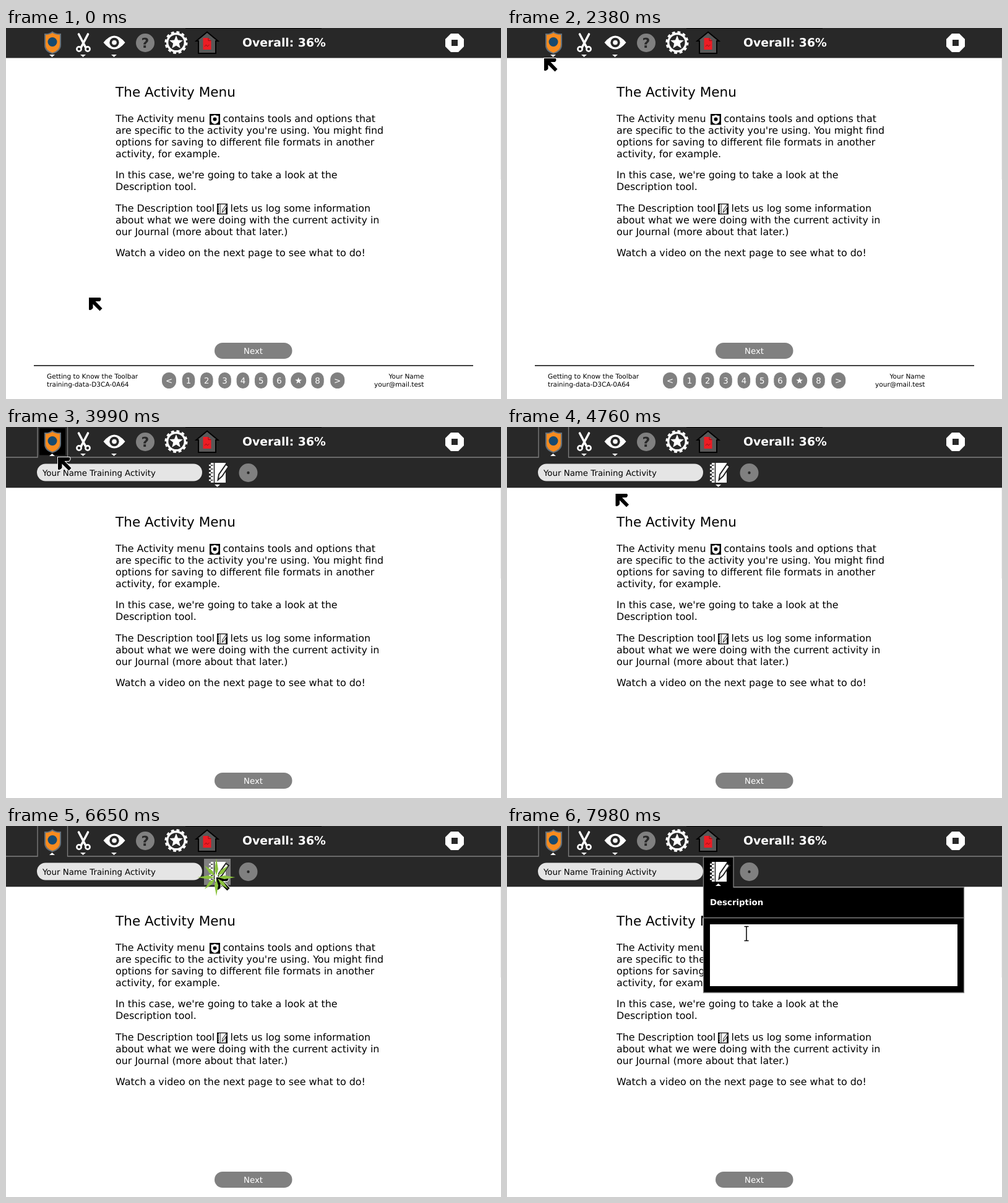
An HTML page that plays this animation: 800x600 px, repeating every 8000 ms.

```html
<!DOCTYPE html>
<html lang="en">
<head>
<meta charset="utf-8">
<title>The Activity Menu</title>
<style>
  html, body { margin: 0; width: 100%; height: 100%; overflow: hidden; background: #fff; }
  svg { display: block; width: 800px; height: 600px; }
  text { font-family: "DejaVu Sans", sans-serif; white-space: pre; text-rendering: geometricPrecision; }
  .body { font-size: 15.9px; }
  .title { font-size: 21.6px; }
  .small { font-size: 10.55px; }
  .ui { font-size: 13.33px; }
  .mid { text-anchor: middle; fill: #fff; }
  .bold { font-weight: bold; fill: #fff; }
</style>
</head>
<body>
<svg viewBox="0 0 800 600" xmlns="http://www.w3.org/2000/svg">
  <defs>
    <g id="book">
      <path d="M3 1H27V33H3Z" fill="#fff"/>
      <path d="M8.500 1V33" stroke="#222" stroke-width="1.600"/>
      <path d="M0 5H5M0 11H5M0 17H5M0 23H5M0 29H5" stroke="#fff" stroke-width="2.600"/>
      <path d="M3 5H6.500M3 11H6.500M3 17H6.500M3 23H6.500M3 29H6.500" stroke="#222" stroke-width="1.300"/>
      <path d="M27.500 5L30.500 7L20.500 22L16 26L17 20Z" fill="#fff" stroke="#222" stroke-width="4" paint-order="stroke"/>
    </g>
    <path id="shield" d="M63 10Q70 10.500 75 6.500Q80 10.500 88 10V27Q88 37 75 41Q62.500 37 63 27Z"/>
    <path id="down" d="M-4.500 0H4.500L0 4Z" fill="#fff"/>
    <path id="up" d="M-4.500 4H4.500L0 0Z" fill="#fff"/>
  </defs>

  <g id="page">
    <text class="title" x="177" y="111">The Activity Menu</text>
    <g id="copy" class="body"></g>
    <g transform="translate(329 139)">
      <rect width="17" height="17.500"/>
      <path d="M2.500 3Q6 3 8.500 1.500Q11 3 14.500 3V11Q14 15 8.500 16.500Q3 15 2.500 11Z" fill="#fff"/>
      <circle cx="8.500" cy="8.500" r="3"/>
    </g>
    <g transform="translate(341 284)">
      <rect width="17" height="17.500"/>
      <use href="#book" transform="translate(1.500 .700) scale(.47)"/>
    </g>
    <rect x="337" y="509" width="125.500" height="26" rx="13" fill="#808080"/>
    <text class="ui mid" x="399.500" y="527">Next</text>
  </g>

  <g id="footer">
    <path d="M45 546H755" stroke="#000" stroke-width="1.600"/>
    <g class="small">
      <text x="66" y="567">Getting to Know the Toolbar</text>
      <text x="66" y="580">training-data-D3CA-0A64</text>
      <text x="675.500" y="567" text-anchor="end">Your Name</text>
      <text x="675.500" y="580" text-anchor="end">your@mail.test</text>
    </g>
    <g id="nav"></g>
  </g>

  <rect x="799" y="48" width="1" height="197" fill="#eee"/>
  <rect width="800" height="48.500" fill="#282828"/>
  <rect x="290" width="220" height="1"/>

  <g id="sub">
    <rect y="48" width="800" height="50.300" fill="#282828"/>
    <path d="M0 49H51V0M99.500 0V49H800" fill="none" stroke="#808080" stroke-width="1.300"/>
    <rect x="50" y="59.500" width="267" height="28" rx="14" fill="#e5e5e5"/>
    <text class="ui" x="59" y="78.500">Your Name Training Activity</text>
    <rect id="bookBg" x="320" y="53" width="43" height="42.500"/>
    <g id="palette">
      <path d="M317.500 50H366V99H738.500V269.500H317.500Z" fill="#000" stroke="#808080" stroke-width="1.300"/>
      <path d="M318 148.500H738" stroke="#808080" stroke-width="1.300"/>
      <text class="ui bold" x="328" y="128">Description</text>
      <rect x="328" y="159" width="400" height="100" fill="#fff"/>
    </g>
    <use href="#book" x="328" y="57"/>
    <use id="bookTip" x="341.500" y="93"/>
    <circle cx="391.500" cy="74" r="15" fill="#808080"/>
    <circle cx="391.500" cy="74" r="2.200" fill="#282828"/>
  </g>

  <rect id="hover" x="54" y="2" width="42" height="43.500"/>
  <use href="#shield" fill="#f68b1f" stroke="#66717a" stroke-width="2"/>
  <circle cx="75" cy="22.500" r="7.500" fill="#164a70"/>
  <use id="menuTip" x="74.500" y="43"/>

  <g fill="none" stroke="#fff" stroke-linecap="round">
    <path d="M117.500 10L128.500 31M132.500 10L121.500 31" stroke-width="3.600"/>
    <circle cx="118" cy="34" r="3.600" stroke-width="2.600"/>
    <circle cx="132" cy="34" r="3.600" stroke-width="2.600"/>
  </g>
  <use href="#down" x="124.500" y="43"/>

  <path d="M157.500 23.500Q175 1.500 192.500 23.500Q175 45.500 157.500 23.500Z" fill="#fff"/>
  <circle cx="175" cy="23.500" r="7.700" fill="#282828"/>
  <circle cx="175" cy="23.500" r="3.800" fill="#fff"/>
  <use href="#down" x="174.500" y="43"/>

  <circle cx="225" cy="24" r="15" fill="#808080"/>
  <text x="225" y="32" text-anchor="middle" font-size="22" font-weight="bold" fill="#282828">?</text>

  <circle cx="275" cy="23.500" r="14.300" fill="none" stroke="#fff" stroke-width="3.400"/>
  <circle cx="275" cy="23.500" r="16.700" fill="none" stroke="#fff" stroke-width="3.600" stroke-dasharray="4.700 4.044"/>
  <path id="star" fill="#fff"/>

  <path d="M325 6.500L342.500 21H339V41H311V21H307.500Z" fill="#585858" stroke="#000" stroke-width="2"/>
  <path d="M318.500 16H327L331.500 20.500V35H318.500Z" fill="#ed1c24"/>
  <path d="M327 16V20.500H331.500M321 30L323.500 27L325.500 30L328.500 27" fill="none" stroke="#8f1016"/>

  <text class="bold" x="382" y="29.500" font-size="18.800">Overall: 36%</text>

  <path d="M719 9H731L740 18V30L731 39H719L710 30V18Z" fill="#fff"/>
  <rect x="720" y="19" width="10" height="10" fill="#282828"/>

  <path id="arrow" d="M0 0H18.500Q21 3 17.500 6H10.500L21.500 17.500L17.500 21.500L6.500 10.500V17Q3 22 0 19.500Z" stroke="#fff" stroke-width="2" paint-order="stroke"/>
  <path id="beam" d="M-3.500 -11.500H3.500M-3.500 11.500H3.500M0 -11.500V11.500" stroke="#000" stroke-width="1.500"/>
  <g id="burst" fill="#8cc33f"></g>
</svg>
<script>
const $ = id => document.getElementById(id);

const copy = [
  [152, "The Activity menu"],
  [171.3, "are specific to the activity you're using. You might find"],
  [190, "options for saving to different file formats in another"],
  [208.7, "activity, for example."],
  [243.4, "In this case, we're going to take a look at the"],
  [262, "Description tool."],
  [297, "The Description tool"],
  [316, "about what we were doing with the current activity in"],
  [334.6, "our Journal (more about that later.)"],
  [369.4, "Watch a video on the next page to see what to do!"]
];
const line = (x, y, s) => `<text x="${x}" y="${y}">${s}</text>`;
$("copy").innerHTML = copy.map(([y, s]) => line(177, y, s)).join("") +
  line(350.5, 152, "contains tools and options that") +
  line(362.5, 297, "lets us log some information");

const starPath = (cx, cy, r, inner) => "M" + Array.from({ length: 10 }, (_, i) => {
  const a = i * Math.PI / 5, d = i % 2 ? inner : r;
  return (cx + d * Math.sin(a)).toFixed(2) + " " + (cy - d * Math.cos(a)).toFixed(2);
}).join("L") + "Z";
$("star").setAttribute("d", starPath(275, 23.5, 11.5, 5));

const nav = [["&lt;", 263.5, 23], ["1", 295, 20.5], ["2", 324.3, 20.5], ["3", 353.6, 20.5],
  ["4", 382.9, 20.5], ["5", 412.2, 20.5], ["6", 441.5, 20.5], ["", 472.7, 25],
  ["8", 503.5, 20.5], ["&gt;", 535.7, 23]];
$("nav").innerHTML = nav.map(([s, x, w]) =>
  `<rect x="${x - w / 2}" y="557" width="${w}" height="26" rx="${w / 2}" fill="#808080"/>` +
  (s ? `<text class="ui mid" x="${x}" y="575">${s}</text>`
     : `<path d="${starPath(x, 570.5, 5.6, 2.2)}" fill="#fff"/>`)).join("");

$("burst").innerHTML = Array.from({ length: 8 }, (_, i) => {
  const r = i % 2 ? 27 : 30.5;
  return `<path d="M0 -3L3 -13L0 ${-r}L-3 -13Z" transform="rotate(${i * 45})"/>`;
}).join("");

// Pointer track: time, x, y
const track = [
  [0, 134, 436], [420, 86, 378], [840, 47, 307], [1050, 38, 272], [1260, 38, 235],
  [1470, 37, 179], [1680, 40, 120], [2030, 50, 76], [2380, 60, 49], [2520, 62, 40],
  [2660, 67, 34], [3500, 67, 34], [3780, 74, 40], [3990, 84, 49], [4270, 108, 72],
  [4620, 154, 101], [4900, 197, 115], [5110, 229, 115], [5390, 272, 107],
  [5600, 304, 97], [5950, 332, 86], [6160, 340, 83], [6650, 340, 83],
  [7350, 364, 130], [7980, 387, 174]
];
function pointer(t) {
  const i = Math.max(1, track.findIndex(p => p[0] >= t));
  const [a, b] = [track[i - 1], track[i]];
  const k = (t - a[0]) / (b[0] - a[0]);
  return [a[1] + (b[1] - a[1]) * k, a[2] + (b[2] - a[2]) * k];
}

const show = (id, on) => $(id).setAttribute("visibility", on ? "visible" : "hidden");
const move = (id, x, y) => $(id).setAttribute("transform", `translate(${x.toFixed(1)} ${y.toFixed(1)})`);
const within = (t, a, b) => t >= a && t < b;

function draw(now) {
  const t = Math.floor(now % 8000 / 70) * 70;
  const [x, y] = pointer(t);
  const open = t >= 3220, palette = t >= 6790;
  const pressed = within(t, 6370, 6720);
  const inEntry = palette && y > 159;

  $("page").setAttribute("transform", `translate(0 ${open ? 50 : 0})`);
  $("footer").style.display = open ? "none" : "";
  $("sub").style.display = open ? "" : "none";
  $("palette").style.display = palette ? "" : "none";
  $("menuTip").setAttribute("href", open ? "#up" : "#down");
  $("bookTip").setAttribute("href", palette ? "#up" : "#down");
  show("hover", within(t, 2940, 4060));
  $("bookBg").style.display = within(t, 5880, 6790) ? "" : "none";
  $("bookBg").setAttribute("fill", pressed ? "#808080" : "#000");

  move("arrow", x, y);
  move("beam", x, y);
  show("arrow", !inEntry);
  show("beam", inEntry);
  move("burst", x, y);
  show("burst", within(t, 3080, 3500) || within(t, 6300, 6720));
}

function tick() {
  draw(performance.now());
  requestAnimationFrame(tick);
}
tick();
</script>
</body>
</html>
```
